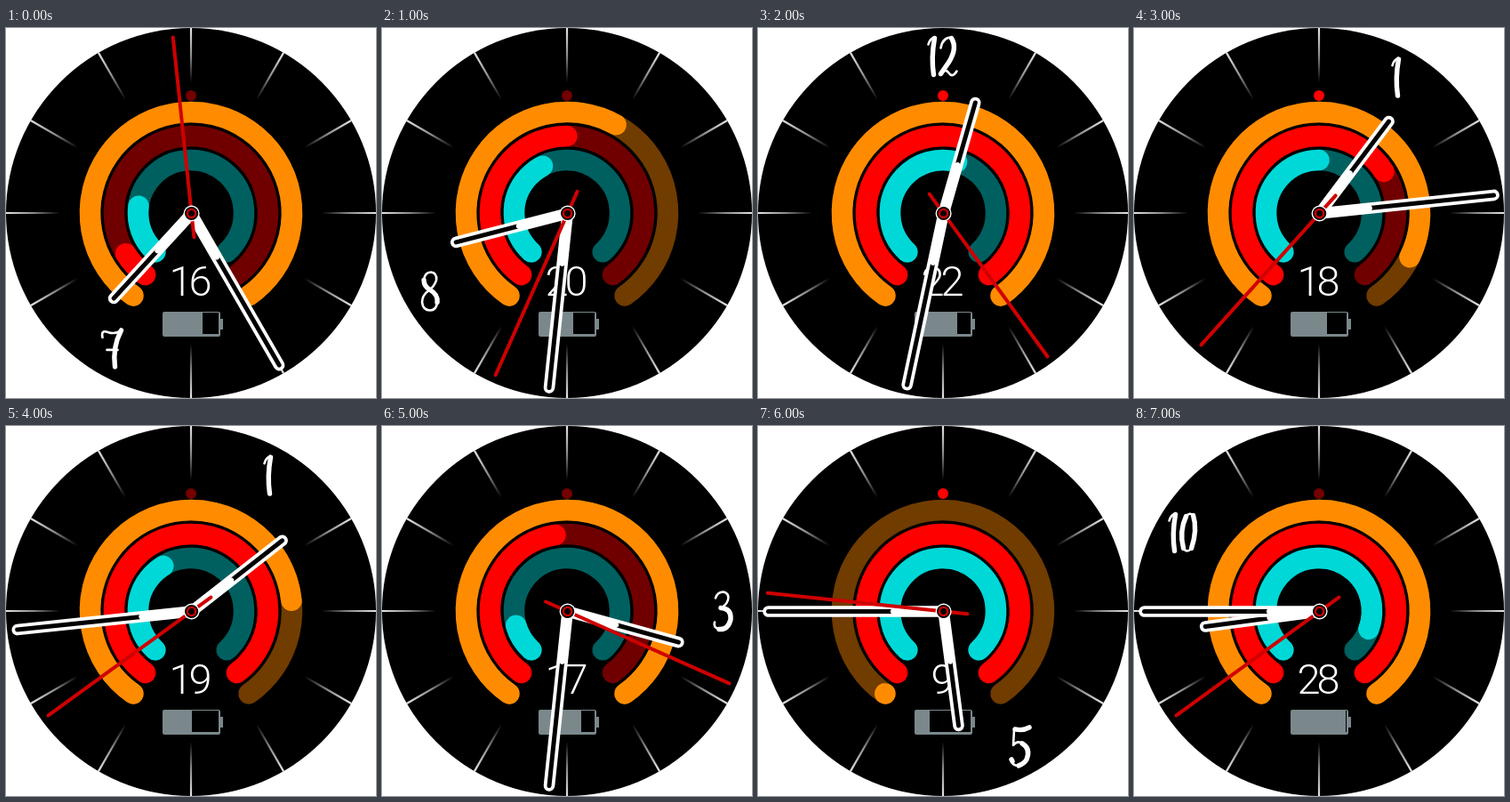
Animation, 416 px wide and 416 px high, one loop 8000 ms. Source, as an HTML page with a canvas:

```html
<!DOCTYPE html>
<html lang="en">
<head>
<meta charset="utf-8">
<title>Watch face</title>
<style>
html, body { margin: 0; width: 100%; height: 100%; overflow: hidden; background: #fff; }
canvas { display: block; }
</style>
</head>
<body>
<canvas id="face" width="416" height="416"></canvas>
<script>
const ctx = document.getElementById('face').getContext('2d');
const C = 208, STEP = 1000, TAU = Math.PI * 2;
const DIM = '#740000', LIT = '#ff0000';

// numeral, hour, minute, second, dot, date, battery edge, orange, red, cyan
const states = [
  [7, 7, 25, 59, DIM, 16, 221, 1, .075, .2],
  [8, 8, 31, 34, DIM, 20, 215, .6, .5, .4],
  [12, 12, 32, 24, LIT, 22, 224, 1, 1, .555],
  [1, 1, 14, 37, LIT, 18, 217, .9, .7, .5],
  [1, 1, 44, 39, DIM, 19, 209, .79, 1, .385],
  [3, 3, 31, 19, DIM, 17, 224, 1, .47, .115],
  [5, 5, 45, 46, LIT, 9, 193, 0, 1, 1],
  [10, 8, 45, 39, DIM, 28, 238, 1, 1, .9]
];

// radius, start angle, colour, track colour
const rings = [
  [113.5, 215, '#ff8c00', '#703c00'],
  [86.5, 216.5, '#ff0000', '#700000'],
  [59.5, 222.5, '#00d8d8', '#006060']
];

// Brush-lettered digits: width, thick strokes, thin strokes
const digits = {
  0: [21, 'M8 5Q0 22 5 41M16 4Q21 20 14 41', 'M8 5Q12 0 16 4M5 41Q9 47 14 41'],
  1: [13, 'M9 3Q5 25 8 44', 'M2 10Q4 3 9 2'],
  2: [22, 'M15 3Q22 14 12 30L3 43', 'M3 14Q5 2 15 2M2 44Q8 36 12 42T21 40'],
  3: [24, 'M10 20Q22 21 21 33Q18 45 8 44', 'M4 9Q6 2 13 2Q20 4 18 11Q16 18 9 20M8 44Q1 42 3 36'],
  5: [26, 'M7 4Q16 6 23 2M15 20Q25 26 20 38Q17 43 11 45M3 38L4 40', 'M6 4L5 22Q10 16 15 20M11 45Q3 45 3 38'],
  7: [25, 'M23 3Q13 22 16 44', 'M2 11Q0 2 8 5T23 3M7 25H19'],
  8: [25, 'M5 11Q5 18 12 22Q21 27 20 36', 'M5 11Q6 2 13 2Q20 3 19 11Q17 18 10 23Q3 28 3 36Q4 45 12 45Q19 45 20 36']
};

const polar = (r, deg) => [C + r * Math.sin(deg * TAU / 360), C - r * Math.cos(deg * TAU / 360)];

function line(deg, from, to, width, color, cap = 'round') {
  ctx.beginPath();
  ctx.moveTo(...polar(from, deg));
  ctx.lineTo(...polar(to, deg));
  ctx.lineWidth = width;
  ctx.strokeStyle = color;
  ctx.lineCap = cap;
  ctx.stroke();
}

function disc(x, y, r, color) {
  ctx.beginPath();
  ctx.arc(x, y, r, 0, TAU);
  ctx.fillStyle = color;
  ctx.fill();
}

function rect(x, y, w, h, color) {
  ctx.fillStyle = color;
  ctx.fillRect(x, y, w, h);
}

function tick(deg) {
  const fade = ctx.createLinearGradient(...polar(208, deg), ...polar(147, deg));
  fade.addColorStop(0, '#e4e4e4');
  fade.addColorStop(.5, '#8c8c8c');
  fade.addColorStop(1, '#000');
  line(deg, 147, 208, 2.2, fade, 'butt');
}

function ring([radius, start, color, track], value) {
  const sweep = 2 * (360 - start);
  const arc = (part, style) => {
    const a = (start - 90) * TAU / 360;
    ctx.beginPath();
    ctx.arc(C, C, radius, a, a + Math.max(part * sweep, .05) * TAU / 360);
    ctx.lineWidth = 23.5;
    ctx.lineCap = 'round';
    ctx.strokeStyle = style;
    ctx.stroke();
  };
  arc(1, track);
  arc(value, color);
}

function numeral(n) {
  const glyphs = [...String(n)].map(d => digits[d]);
  const width = glyphs.reduce((sum, g) => sum + g[0], 0);
  const [x, y] = polar(176, n * 30);
  ctx.save();
  ctx.translate(x - width / 2 - 1, y - 23.5);
  ctx.strokeStyle = '#fff';
  ctx.lineCap = ctx.lineJoin = 'round';
  for (const [advance, thick, thin] of glyphs) {
    ctx.lineWidth = 5.4;
    ctx.stroke(new Path2D(thick));
    ctx.lineWidth = 2.6;
    ctx.stroke(new Path2D(thin));
    ctx.translate(advance, 0);
  }
  ctx.restore();
}

function date(n) {
  ctx.font = '300 47px Roboto, sans-serif';
  ctx.fontStretch = 'semi-condensed';
  ctx.letterSpacing = '-4px';
  ctx.textAlign = 'center';
  ctx.fillStyle = '#fff';
  ctx.fillText(n, 205.5, 301.3);
}

function battery(edge) {
  ctx.beginPath();
  ctx.roundRect(176, 319, 65, 28, 2);
  ctx.fillStyle = '#7a888c';
  ctx.fill();
  rect(241, 327, 3, 12, '#7a888c');
  rect(edge, 320, 239 - edge, 24, '#000');
}

function hand(deg, length) {
  line(deg, 0, length, 12.6, '#fff');
  line(deg, 59, length, 5, '#000');
  line(deg, 40, 57, 5.4, '#fff');
}

function draw([label, h, m, s, dot, day, edge, ...values]) {
  rect(0, 0, 416, 416, '#fff');
  disc(C, C, 208, '#000');
  for (let i = 1; i <= 12; i++) if (i !== label) tick(i * 30);
  numeral(label);
  rings.forEach((r, i) => ring(r, values[i]));
  disc(C, 76, 6, dot);
  date(day);
  battery(edge);

  ctx.save();
  ctx.translate(.6, .5);
  hand(h * 30 + m / 2, 129.5);
  hand(m * 6, 197);
  line(s * 6, -27, 199, 4, '#d00000');
  disc(C, C, 9, '#fff');
  disc(C, C, 7.6, '#000');
  disc(C, C, 5.8, '#d00000');
  disc(C, C, 3.4, '#000');
  ctx.restore();
}

const begin = performance.now();
function frame() {
  const t = performance.now() - begin;
  draw(states[Math.floor(t / STEP) % states.length]);
  requestAnimationFrame(frame);
}
frame();
</script>
</body>
</html>
```
